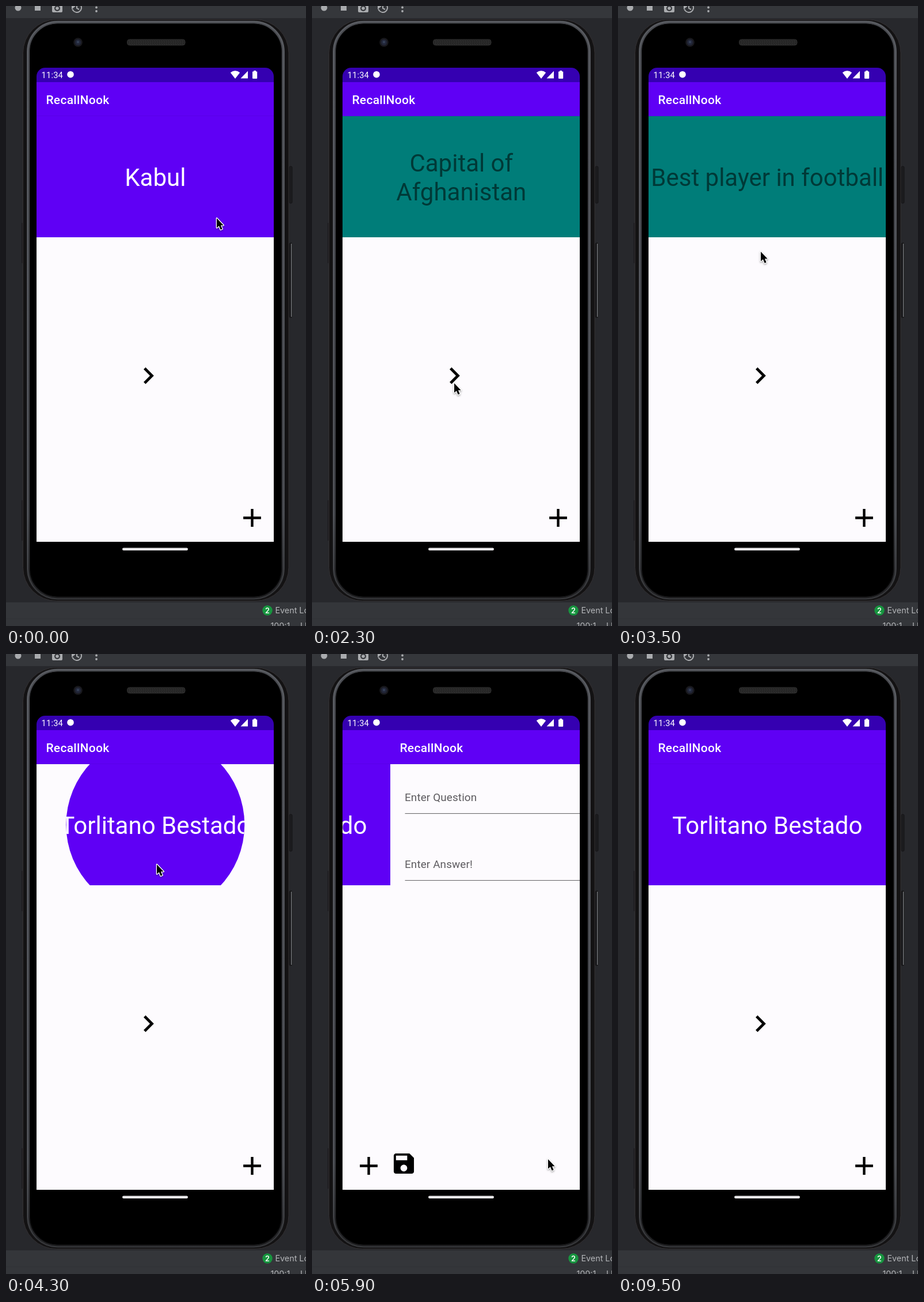
Animation, 521 px wide and 1075 px high, one loop 9.6 s. Source, as an HTML page with a canvas:

```html
<!DOCTYPE html>
<html lang="en">
<head>
<meta charset="utf-8">
<title>Flash cards</title>
<style>
  html, body { margin: 0; width: 100%; height: 100%; overflow: hidden; background: #27282c; }
  canvas { display: block; width: 521px; height: 1075px; }
</style>
</head>
<body>
<canvas id="stage" width="521" height="1075"></canvas>
<script>
const ctx = document.getElementById('stage').getContext('2d');
const LOOP = 9600, STEP = 100;
const SCREEN = { x: 53, y: 107, w: 412, h: 822 };
const CARD = { y: 191, h: 210 };
const MID = SCREEN.x + SCREEN.w / 2;
const PURPLE = '#5f00f5', TEAL = '#007d79', PAPER = '#fdfbfe';
const ROBOTO = 'Roboto, sans-serif', INTER = 'Inter, sans-serif';
const APP = 'RecallNook';
const FIRST = ['Capital of', 'Afghanistan'], SECOND = ['Best player in football'];
const ANSWER_1 = ['Kabul'], ANSWER_2 = ['Torlitano Bestado'];

const ICONS = {
  next: new Path2D('M10 6 8.59 7.41 13.17 12 8.59 16.59 10 18 16 12z'),
  add: new Path2D('M19 13h-6v6h-2v-6H5v-2h6V5h2v6h6z'),
  save: new Path2D('M17 3H5c-1.11 0-2 .9-2 2v14c0 1.1.89 2 2 2h14c1.1 0 2-.9 2-2V7l-4-4zm-5 16c-1.66 0-3-1.34-3-3s1.34-3 3-3 3 1.34 3 3-1.34 3-3 3zm3-10H5V5h10v4z'),
  cross: new Path2D('M17 15.59 15.59 17 12 13.41 8.41 17 7 15.59 10.59 12 7 8.41 8.41 7 12 10.59 15.59 7 17 8.41 13.41 12z')
};
const ARROW = new Path2D('M0 0V16.5L3.9 13.2 6.6 19.8 9.6 18.5 6.9 12.2H11.7z');

// Pointer stops: time, x, y
const STOPS = [
  [0, 366, 368], [700, 300, 525], [900, 300, 525], [1500, 247, 654],
  [2900, 247, 654], [3500, 248, 426], [3800, 262, 365], [4700, 262, 365],
  [5300, 410, 876], [6200, 410, 876], [7000, 438, 883], [7900, 438, 883],
  [8700, 446, 8]
];

const clamp = v => Math.min(1, Math.max(0, v));
const part = (t, start, length) => clamp((t - start) / length);
const ease = p => (1 - Math.cos(Math.PI * p)) / 2;
const mix = (a, b, p) => a + (b - a) * p;

function rect(x, y, w, h, color) {
  ctx.fillStyle = color;
  ctx.fillRect(x, y, w, h);
}

function roundRect(x, y, w, h, r, fill, line, width = 1) {
  ctx.beginPath();
  ctx.roundRect(x, y, w, h, r);
  if (fill) { ctx.fillStyle = fill; ctx.fill(); }
  if (line) { ctx.strokeStyle = line; ctx.lineWidth = width; ctx.stroke(); }
}

function disc(x, y, r, color) {
  ctx.beginPath();
  ctx.arc(x, y, r, 0, Math.PI * 2);
  ctx.fillStyle = color;
  ctx.fill();
}

function shape(points, color) {
  ctx.beginPath();
  points.forEach(p => ctx.lineTo(...p));
  ctx.closePath();
  ctx.fillStyle = color;
  ctx.fill();
}

function text(str, x, y, font, color, align = 'left', spacing = 0) {
  ctx.font = font;
  ctx.fillStyle = color;
  ctx.textAlign = align;
  ctx.letterSpacing = spacing + 'px';
  ctx.fillText(str, x, y);
}

function icon(name, x, y, scale, color = '#000') {
  ctx.save();
  ctx.translate(x, y);
  ctx.scale(scale, scale);
  ctx.translate(-12, -12);
  ctx.fillStyle = color;
  ctx.fill(ICONS[name]);
  ctx.restore();
}

function shifted(dx, draw) {
  ctx.save();
  ctx.translate(Math.round(dx), 0);
  draw();
  ctx.restore();
}

function drawToolStrip() {
  const grey = '#a9abae';
  rect(0, 0, 521, 21, '#35373b');
  disc(21, 3, 5.5, grey);
  rect(50, 0, 10, 8, grey);
  roundRect(80, -3, 18, 14, 2, grey);
  disc(89, 4, 5, '#35373b');
  disc(89, 4, 2.8, grey);
  ctx.strokeStyle = grey;
  ctx.lineWidth = 2;
  ctx.beginPath();
  ctx.arc(123, 3, 8, -0.6, 2.8);
  ctx.moveTo(123, -1);
  ctx.lineTo(123, 4);
  ctx.lineTo(127, 6);
  ctx.stroke();
  shape([[114, 0], [121, 0], [114, 6]], grey);
  disc(157, 2.5, 1.9, grey);
  disc(157, 9, 1.9, grey);
}

function drawFooter() {
  rect(0, 1034, 521, 41, '#34363a');
  rect(0, 1062, 521, 1, '#303236');
  disc(454, 1048, 8.7, '#17953f');
  text('2', 454, 1052.5, '600 12.5px ' + INTER, '#fff', 'center');
  text('Event Log', 467.5, 1053, '14.3px ' + INTER, '#b4b6b9');
  text('100:1', 459.5, 1080, '14.3px ' + INTER, '#b4b6b9');
  text('LF', 511, 1080, '14.3px ' + INTER, '#b4b6b9');
}

function drawPhone() {
  roundRect(492, 278, 5, 64, 2, '#1c1c1f', '#151517');
  roundRect(492, 411, 5, 129, 2, '#1b1b1e', '#111');
  rect(495, 412, 1.5, 127, '#707276');
  rect(27, 376, 2, 70, '#1e1d20');
  rect(27, 857, 2, 70, '#1e1d20');

  roundRect(29.5, 23.5, 461.5, 1008, 58, '#131213', '#343133');
  const metal = ctx.createLinearGradient(0, 24, 0, 1032);
  metal.addColorStop(0, '#4c4e53');
  metal.addColorStop(0.12, '#484a50');
  metal.addColorStop(0.85, '#3e4045');
  metal.addColorStop(1, '#202022');
  roundRect(38.5, 28, 443, 999, 51, '#000', metal, 5);
  roundRect(37.5, 27, 445, 1001, 52, null, 'rgba(170,174,182,.3)');
  roundRect(42, 31, 436, 993, 48, '#000', '#0c0c0d');

  disc(125, 63, 7.8, '#19191d');
  disc(125, 63, 5.2, '#222638');
  disc(125, 62.5, 2.2, '#354057');
  roundRect(210.5, 58, 100.5, 10, 4, '#242424', '#303030');
  ctx.strokeStyle = '#343434';
  ctx.lineWidth = 1;
  ctx.setLineDash([2, 2]);
  ctx.beginPath();
  for (let y = 60.5; y < 67; y += 2) {
    ctx.moveTo(213 + y % 4 / 2, y);
    ctx.lineTo(309, y);
  }
  ctx.stroke();
  ctx.setLineDash([]);
  roundRect(202, 939.5, 114, 4.6, 2.3, '#e9e8ea');
}

function drawStatusBar() {
  rect(SCREEN.x, 107, SCREEN.w, 25, '#3500b1');
  text('11:34', 61.5, 125, '14.7px ' + ROBOTO, '#fff', 'left', 0.2);
  disc(112, 118.7, 5.8, '#fff');
  ctx.beginPath();
  ctx.moveTo(398, 126);
  ctx.lineTo(389.8, 115.6);
  ctx.quadraticCurveTo(398, 109, 406.2, 115.6);
  ctx.fillStyle = '#fff';
  ctx.fill();
  shape([[407.5, 125.5], [420, 125.5], [420, 112.8]], '#fff');
  roundRect(428, 113.5, 8.2, 12.5, 1, '#fff');
  rect(430.3, 112, 3.6, 2, '#fff');
}

function drawAppBar() {
  rect(SCREEN.x, 132, SCREEN.w, 59, PURPLE);
  rect(SCREEN.x, 190, SCREEN.w, 1, 'rgba(0,0,0,.06)');
  text(APP, 69.5, 169.5, '500 21px ' + ROBOTO, '#fff', 'left', 0.26);
}

function drawCard(lines, back, ink) {
  rect(SCREEN.x, CARD.y, SCREEN.w, CARD.h, back);
  const base = 312 - (lines.length - 1) * 24.6;
  lines.forEach((line, i) => text(line, MID + 0.3, base + i * 49.2, '42px ' + ROBOTO, ink, 'center'));
}

const drawQuestion = lines => drawCard(lines, TEAL, 'rgba(0,0,0,.54)');
const drawAnswer = lines => drawCard(lines, PURPLE, '#fff');

function drawCards(t) {
  if (t < 2300) {
    drawAnswer(ANSWER_1);
  } else if (t < 2800) {
    shifted(-SCREEN.w * ease(part(t, 2300, 500)), () => drawQuestion(FIRST));
  } else if (t < 4000) {
    shifted(SCREEN.w * (1 - ease(part(t, 2800, 500))), () => drawQuestion(SECOND));
  } else {
    // Circular reveal of the answer
    ctx.save();
    ctx.beginPath();
    ctx.arc(MID + 0.3, CARD.y + CARD.h / 2, 231.5 * ease(part(t, 3995, 500)), 0, Math.PI * 2);
    ctx.clip();
    drawAnswer(ANSWER_2);
    ctx.restore();
  }
}

function drawDeck(t) {
  rect(SCREEN.x, 132, SCREEN.w, 797, PAPER);
  drawCards(t);
  drawAppBar();
  icon('next', 247.2, 641, 2.4);
  icon('add', 427.5, 887.5, 2.2);
}

function drawField(label, y) {
  text(label, 78, y, '18.9px ' + ROBOTO, '#5d5b5f', 'left', 0.12);
  rect(78.5, y + 21, 362, 1.1, '#6c6a6d');
}

function drawForm() {
  rect(SCREEN.x, 132, SCREEN.w, 797, PAPER);
  drawAppBar();
  drawField('Enter Question', 255);
  drawField('Enter Answer!', 371);
  icon('save', 76.5, 883.5, 1.95);
  disc(432, 883.5, 22, '#000');
  icon('cross', 432, 883.5, 2.2, '#fff');
}

function drawScreen(t) {
  ctx.save();
  ctx.beginPath();
  ctx.roundRect(SCREEN.x, SCREEN.y, SCREEN.w, SCREEN.h, [15, 15, 0, 0]);
  ctx.clip();
  const slide = Math.round(SCREEN.w * ease(part(t, 5548, 500)));
  const fade = 1 - part(t, 7600, 200);
  shifted(t < 7600 ? -slide : 0, () => drawDeck(t));
  if (slide > 0 && fade > 0) {
    ctx.globalAlpha = fade;
    shifted(SCREEN.w - slide, drawForm);
    ctx.globalAlpha = 1;
  }
  drawStatusBar();
  ctx.restore();
}

function drawPointer(t) {
  const i = STOPS.findIndex(s => s[0] > t);
  if (i < 0) return;
  const [t0, x0, y0] = STOPS[i - 1], [t1, x1, y1] = STOPS[i];
  const p = ease(part(t, t0, t1 - t0));
  ctx.save();
  ctx.translate(mix(x0, x1, p), mix(y0, y1, p));
  ctx.lineWidth = 2.6;
  ctx.lineJoin = 'round';
  ctx.strokeStyle = '#fff';
  ctx.shadowColor = 'rgba(0,0,0,.35)';
  ctx.shadowBlur = 3;
  ctx.shadowOffsetY = 1.5;
  ctx.stroke(ARROW);
  ctx.shadowColor = 'transparent';
  ctx.fillStyle = '#000';
  ctx.fill(ARROW);
  ctx.restore();
}

function render(now) {
  const t = Math.floor(now % LOOP / STEP) * STEP;
  rect(0, 0, 521, 1075, '#27282c');
  drawToolStrip();
  drawFooter();
  drawPhone();
  drawScreen(t);
  drawPointer(t);
}

const start = performance.now();
function tick() {
  render(performance.now() - start);
  requestAnimationFrame(tick);
}
tick();
</script>
</body>
</html>
```
